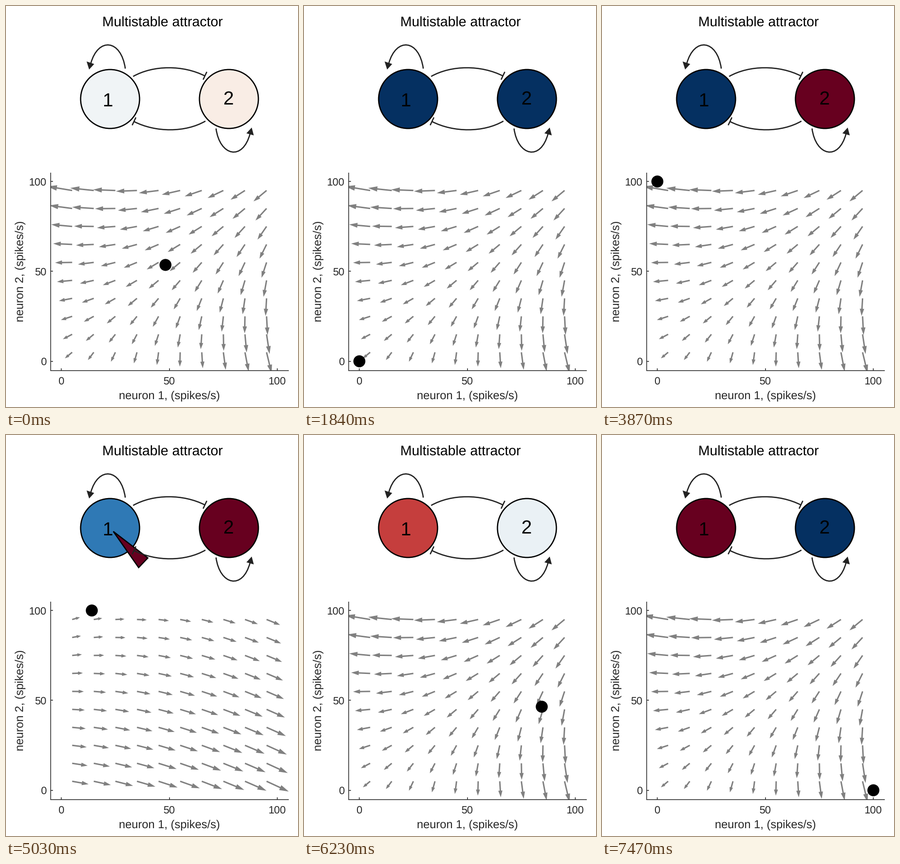
A matplotlib script for the animation above (8470 ms loop, 634 by 871 pixels).

```python
import matplotlib as mpl
import matplotlib.pyplot as plt
import numpy as np
from matplotlib.animation import FuncAnimation
from matplotlib.collections import PolyCollection
from matplotlib.patches import Circle, PathPatch, Polygon, Rectangle
from matplotlib.path import Path

W, H, DPI = 634, 871, 64
TICK, LOOP = 10, 8470             # ms
RATE = 0.0272 / 40                # network time per ms
DRIVE = 300
CUES = {2: (2815, 3815), 1: (4836, 5824)}
HOLDS = [(1840, 2840), (3320, 3870), (3870, 4870), (7470, LOOP)]
INK, AXIS, GRAY, CUE = "#222222", "#262626", "#808080", "#67001f"

mpl.rcParams["font.family"] = "Liberation Sans"
mpl.rcParams["text.hinting"] = "none"
mpl.rcParams["text.hinting_factor"] = 1


def pt(px):
    return px * 72 / DPI


def to_px(x, y):
    return 120.2 + 4.69 * x, 771.7 - 3.905 * y


# Network model

def flow(x, y, cue=0):
    """Self-excitation, mutual inhibition, threshold and an optional cue."""
    dx = x - 1.5 * y - 50 + DRIVE * (cue == 1)
    dy = y - 1.5 * x - 50 + DRIVE * (cue == 2)
    return dx, dy


def cue_at(t, lag=0):
    for unit, (on, off) in CUES.items():
        if on < t < off + lag:
            return unit
    return 0


def simulate(x=48.2, y=53.6, dt=2):
    track = []
    for t in range(0, LOOP + 1, dt):
        if t % TICK == 0:
            track.append((x, y))
        dx, dy = flow(x, y, cue_at(t + dt / 2))
        x = min(max(x + dx * RATE * dt, 0), 100)
        y = min(max(y + dy * RATE * dt, 0), 100)
    return track


def shown_time(t):
    """Snap to the 40 ms steps, with pauses."""
    for start, end in HOLDS:
        if start <= t < end:
            return start
    base = 4870 if t >= 4870 else 0
    return base + (t - base) // 40 * 40


def arrow(tail, tip, half=1.55):
    tail, tip = np.array(tail), np.array(tip)
    length = np.hypot(*(tip - tail))
    along = (tip - tail) / length
    side = np.array([-along[1], along[0]])
    neck = tip - (0.33 * length + 2) * along
    wide = 0.07 * length + 2.2
    tip = tip + 1.3 * along
    return [tail + half * side, neck + half * side, neck + wide * side, tip,
            neck - wide * side, neck - half * side, tail - half * side]


def field(cue):
    x, y = np.meshgrid(np.arange(5, 100, 10), np.arange(5, 100, 10))
    u, v = flow(x, y, cue)
    scale = 0.9 * np.hypot(9, 9) / np.hypot(u, v).max()
    rows = zip(x.flat, y.flat, (u * scale).flat, (v * scale).flat)
    return [arrow(to_px(a, b), to_px(a + p, b + q)) for a, b, p, q in rows]


# Stage

fig = plt.figure(figsize=(W / DPI, H / DPI), dpi=DPI, facecolor="white")
ax = fig.add_axes([0, 0, 1, 1])
ax.set(xlim=(0, W), ylim=(H, 0))
ax.axis("off")


def label(x, y, s, px, color=AXIS, ha="center", z=6, **kw):
    ax.text(x, y, s, fontsize=pt(px), color=color, ha=ha, va="baseline",
            zorder=z, **kw)


def stroke(points, lw=2.7, color=INK, curve=False, z=4):
    codes = [Path.MOVETO] + [Path.CURVE4 if curve else Path.LINETO] * (len(points) - 1)
    ax.add_patch(PathPatch(Path(points, codes), fill=False, ec=color,
                           lw=pt(lw), capstyle="butt", zorder=z))


def unit(x, name, baseline, text_x):
    disc = Circle((x, 202), 64, ec="black", lw=pt(2.7), zorder=2)
    ax.add_patch(disc)
    label(text_x, baseline, name, 41, "black")
    return disc


def wedge(x):
    tri = Polygon([(x, 209.5), (x + 75, 267), (x + 55, 288)], fc=CUE,
                  ec="black", lw=pt(2.6), joinstyle="miter", zorder=3)
    ax.add_patch(tri)
    return tri


label(340, 45, "Multistable attractor", 29.8, "black")
discs = unit(226, "1", 218, 221.5), unit(484, "2", 214, 483.5)
wedges = {1: wedge(233), 2: wedge(491)}

# Connections
stroke([(259, 136), (250, 72), (200, 67), (184, 125)], curve=True)
stroke([(456, 266), (464, 326), (514, 338), (530, 277)], curve=True)
stroke([(276, 153), (320, 128), (385, 128), (432, 152)], curve=True)
stroke([(433, 250), (390, 275), (325, 275), (278, 251)], curve=True)
stroke([(436, 143), (428, 160)])
stroke([(282, 242), (274, 259)])
for head in ([(180.5, 138), (175, 120.5), (191.5, 126)],
             [(533.5, 264), (522, 276.5), (538, 281)]):
    ax.add_patch(Polygon(head, fc=INK, ec="none", zorder=4))

# Plot axes
stroke([(97, 362), (97, 791.5), (613.5, 791.5)], 1.6, AXIS)
for value in (0, 50, 100):
    x, y = to_px(value, value)
    stroke([(x, 791.5), (x, 786.5)], 1.6, AXIS)
    stroke([(97, y), (102, y)], 1.6, AXIS)
    label(x - 0.7, 822, str(value), 23)
    label(88, y + 8.3, str(value), 23, ha="right")
label(354.5, 854, "neuron 1, (spikes/s)", 25.3)
label(38, 576.5, "neuron 2, (spikes/s)", 25.3, rotation=90,
      rotation_mode="anchor")

fields = []
for cue in range(3):
    arrows = PolyCollection(field(cue), fc=GRAY, ec="none", zorder=3)
    ax.add_collection(arrows, autolim=False)
    frame = Rectangle((96.5, 361.5), 517.5, 430.5, transform=ax.transData)
    arrows.set_clip_path(frame)
    fields.append(arrows)

dot = Circle((0, 0), 13, fc="black", ec="none", zorder=5)
ax.add_patch(dot)

track = simulate()
cmap = mpl.colormaps["RdBu_r"]


def draw(i):
    t = shown_time(i * TICK)
    rates = track[t // TICK]
    cue = cue_at(t, lag=40)
    dot.center = to_px(*rates)
    for disc, rate in zip(discs, rates):
        disc.set_facecolor(cmap(rate / 100))
    for k, arrows in enumerate(fields):
        arrows.set_visible(k == cue)
    for k, tri in wedges.items():
        tri.set_visible(k == cue)
    return [dot, *discs, *fields, *wedges.values()]


anim = FuncAnimation(fig, draw, frames=LOOP // TICK, interval=TICK,
                     repeat=True, repeat_delay=0, blit=False)
plt.show()
```
